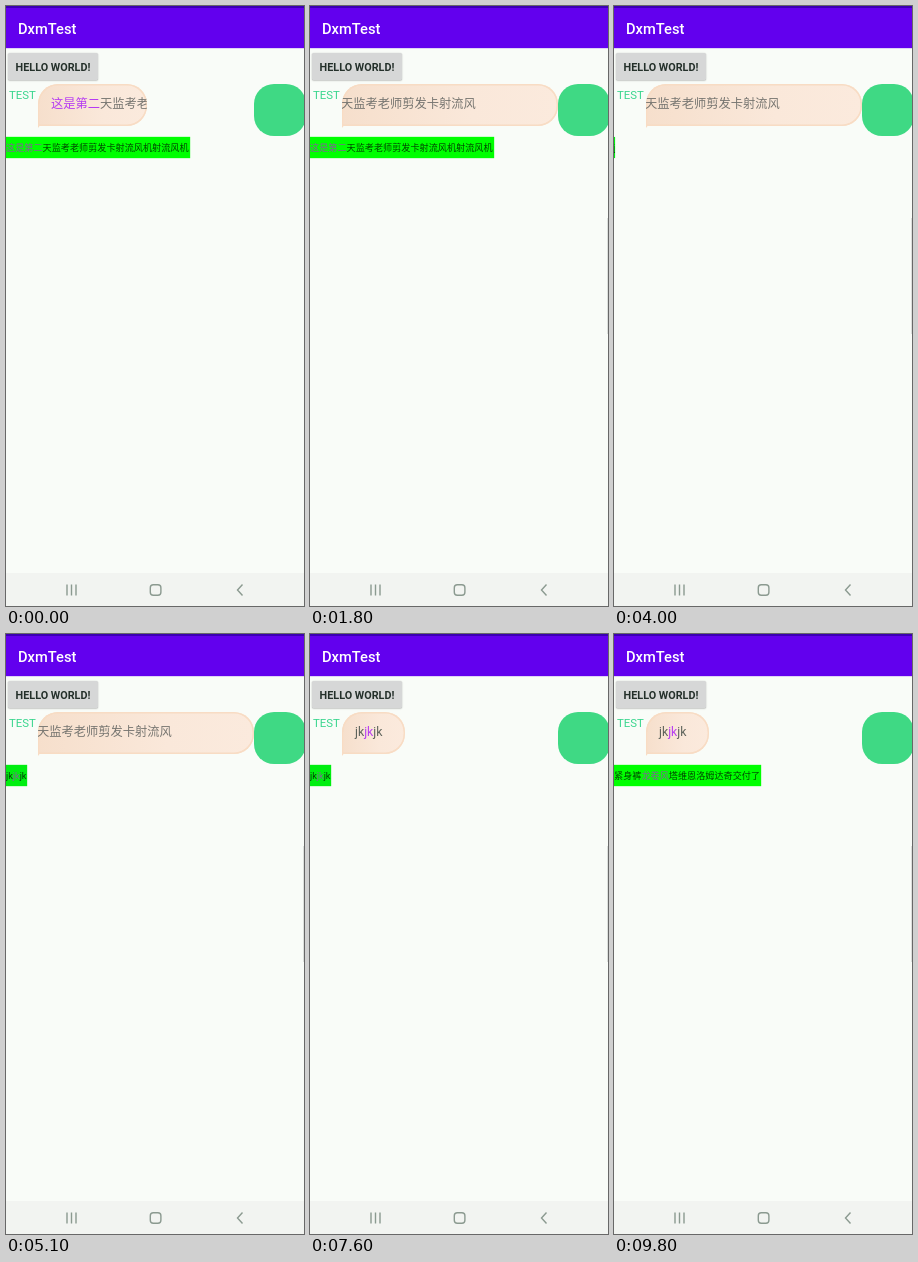
Write an HTML page that moves like this. It is 298x600 px and loops after 10 s.

```html
<!DOCTYPE html>
<html lang="zh-CN">
<head>
<meta charset="utf-8">
<title>DxmTest</title>
<style>
html, body { margin: 0; width: 100%; height: 100%; overflow: hidden; background: #f9fcf8; }
#stage { position: relative; width: 298px; height: 600px; overflow: hidden; background: #f9fcf8;
  font-family: Roboto, "Noto Sans CJK SC", "Noto Sans CJK", sans-serif; white-space: pre; }
#stage > * { position: absolute; box-sizing: border-box; }
#bar { left: 0; top: 0; width: 298px; height: 42px; background: #6200ee; border-top: 2px solid #3c00b4;
  box-shadow: 0 0 1px #6200ee; color: #fff; font: 500 14.7px/43px Roboto, sans-serif; padding-left: 12px; }
#button { left: 2px; top: 47px; width: 90px; height: 27px; border-radius: 1.5px; background: #d6d7d7;
  box-shadow: 0 .5px 1.5px #0005; color: #24302a; text-align: center;
  font: 700 10.8px/29px Roboto, sans-serif; }
#label { left: 3px; top: 81px; font-size: 11.4px; line-height: 17px; color: #3bd68f; }
#bubble { left: 32px; top: 78px; height: 41.5px; overflow: hidden; border-radius: 20px 20px 20px 0;
  box-shadow: inset 0 0 0 1.5px #f8dcc4; background: linear-gradient(90deg, #f6dfcc, #fae8da 60%, #fbeadd); }
#bubble div { position: absolute; left: 13px; top: 0; font-size: 12.25px; line-height: 41px; }
#tail { left: 32px; top: 117px; width: 4px; height: 5px; background: #f8dcc4; clip-path: polygon(0 0, 100% 0, 0 100%); }
#strip { left: 0; top: 131px; height: 21px; overflow: hidden; font-size: 9.15px; line-height: 22px; color: #000b; }
#bubble b { font-weight: 400; color: #b63cf2; }
#strip b { font-weight: 400; color: #806296; }
#icon { left: 248px; top: 78px; width: 52px; height: 52px; border-radius: 20px; background: #3fd984; }
#edge { left: 297px; top: 212px; width: 1px; height: 116px; background: #dcdfdc; }
#nav { left: 0; top: 567px; background: #f2f4f1; }
</style>
</head>
<body>
<div id="stage">
  <div id="bar">DxmTest</div>
  <div id="button">HELLO WORLD!</div>
  <div id="label">TEST</div>
  <div id="tail"></div>
  <div id="bubble"><div></div></div>
  <div id="strip"></div>
  <div id="icon"></div>
  <div id="edge"></div>
  <svg id="nav" width="298" height="33" fill="none" stroke="#8b9a90" stroke-width="1.4">
    <path d="M61 11.5v11M65.5 11.5v11M70 11.5v11M236.5 11.5l-5 5.5l5 5.5"/>
    <rect x="144.3" y="11.8" width="10.6" height="10.4" rx="3"/>
  </svg>
</div>
<script>
const LOOP = 10000, MORPH = 1000;
const $ = q => document.querySelector(q);
const bubble = $('#bubble'), message = $('#bubble div'), strip = $('#strip'), edge = $('#edge');
const clamp = x => Math.min(1, Math.max(0, x));

const keys = 'jk<b>jk</b>jk';
const line = '<b>这是第二</b>天监考老师剪发卡射流风';
const longLine = line + '机射流风机';
const news = '紧身裤<b>龙卷风</b>塔维恩洛姆达奇交付了';

// Each change closes the box to nothing, then opens it with the new text.
const bubbleSteps = [
  { at: -667, from: [63, keys], to: [216, line] },
  { at: 5700, from: [216, line], to: [63, keys] }
];
const stripSteps = [
  { at: -2000, from: [183.5, longLine], to: [183.5, longLine] },
  { at: 3500, from: [183.5, longLine], to: [21.4, keys] },
  { at: 8600, from: [21.4, keys], to: [147, news] }
];

function pose(steps, t) {
  const step = steps.filter(s => s.at <= t).pop();
  const p = .5 - .5 * Math.cos(Math.PI * clamp((t - step.at) / MORPH));
  const [width, text] = p < .5 ? step.from : step.to;
  return { width: Math.max(1, width * Math.abs(1 - 2 * p)), text };
}

function show(box, holder, { width, text }) {
  box.style.width = width + 'px';
  if (holder.text !== text) holder.innerHTML = holder.text = text;
}

function draw(now) {
  const t = now % LOOP;
  const b = pose(bubbleSteps, t), s = pose(stripSteps, t);
  show(bubble, message, b);
  show(strip, strip, s);
  const green = s.text === keys ? '#00ee10' : '#00ff00';
  strip.style.background = green;
  strip.style.boxShadow = `0 0 1px ${green}`;
  const scroll = b.text === line ? 63 * clamp((t - 250) / 1150) : 0;
  message.style.transform = `translateX(${-scroll}px)`;
  message.style.color = b.text === keys ? '#5c625a' : '#767570';
  edge.style.visibility = t < 100 ? 'hidden' : 'visible';
}

const start = performance.now();
function tick() {
  draw(performance.now() - start);
  requestAnimationFrame(tick);
}
tick();
</script>
</body>
</html>
```
